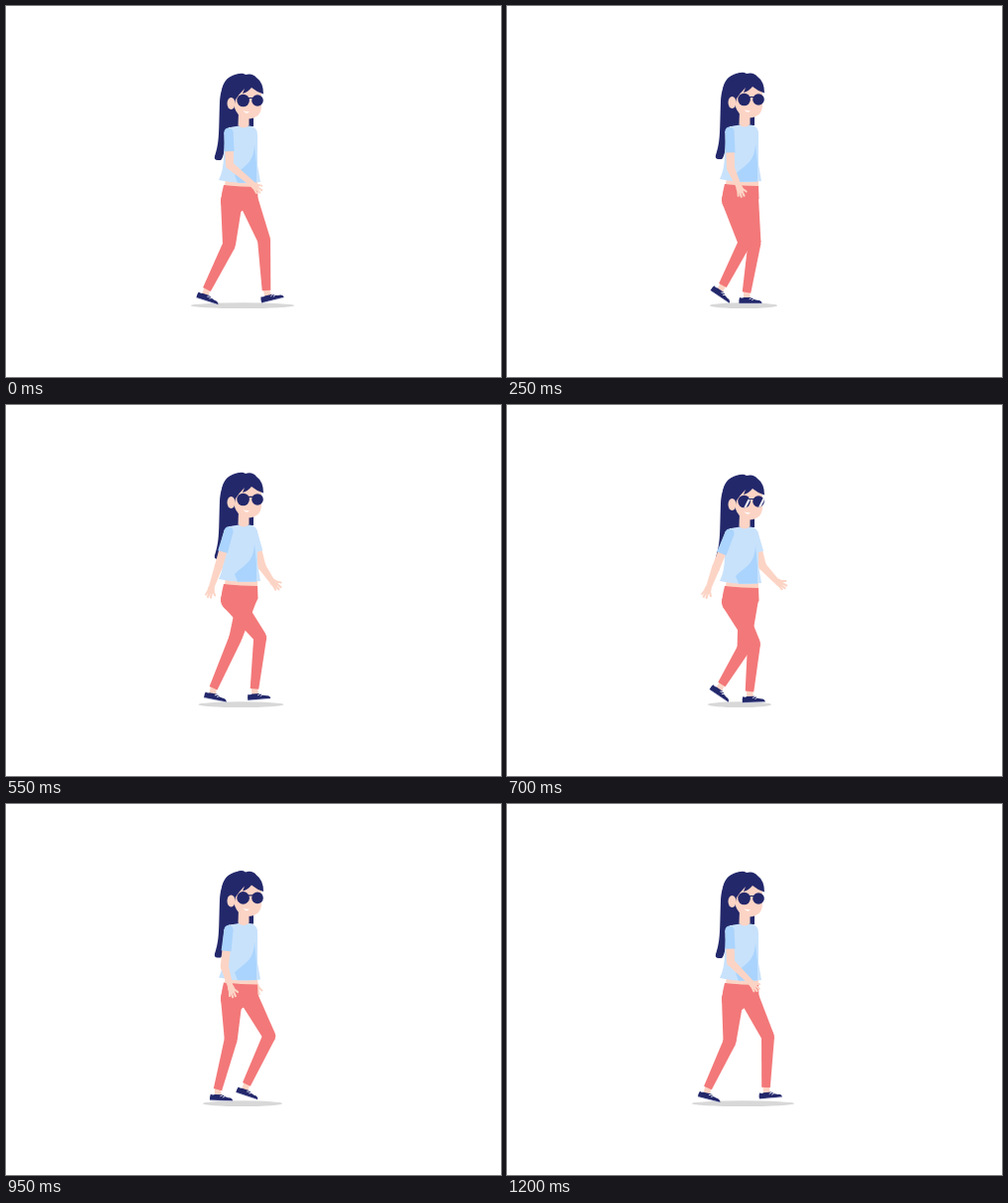
Recreate the animation shown at these times as an HTML page with a canvas. Size 498 by 373 pixels, loop 1.25 s.

```html
<!DOCTYPE html>
<html lang="en">
<head>
<meta charset="utf-8">
<title>Walk cycle</title>
<style>
html, body { margin: 0; width: 100%; height: 100%; overflow: hidden; background: #fff; }
canvas { display: block; }
</style>
</head>
<body>
<canvas id="stage" width="498" height="373"></canvas>
<script>
const ctx = document.getElementById('stage').getContext('2d');
const LOOP = 1250, STEP = 50;
const NAVY = '#23286b', SKIN = '#fcd4c5', PANTS = '#f37879',
      SHIRT = '#c8e2fc', SHADE = '#aad4fd', GREY = '#d8d8d8';

const times = [0, 250, 450, 600, 700, 850, 1050, 1200];

// Legs: knee x, knee y, ankle x, ankle y, foot angle in degrees
const farLeg = [
  [259.5, 235, 262, 286, -14], [249, 238, 241, 288, 0],
  [234, 224, 217, 286, 3], [231, 240, 207, 284, 17],
  [238, 245, 216, 281, 34], [262, 235, 233, 281, 28],
  [264, 233, 250, 283, 8], [262.5, 234, 260.5, 285, -5]
];
const nearLeg = [
  [224.5, 240, 202, 285, 18], [239, 238, 217, 281, 34],
  [245, 232, 232, 282, 13], [259, 235, 256, 287, -11],
  [248.5, 240, 244, 288, -2], [233, 238, 224, 288, 0],
  [222, 236, 204.5, 286, 5], [224, 239, 202, 285.5, 14]
];
// Arms: elbow x, elbow y, wrist x, wrist y, hand angle in degrees
const nearArm = [
  [225, 160, 248, 179, 42], [225, 163, 233, 181, 68],
  [220, 160, 217, 184, 88], [211, 164, 203, 182, 108],
  [210, 164, 203, 183, 110], [214, 163, 218, 184, 70],
  [225, 163, 233, 182, 72], [225, 159, 245, 179, 46]
];
const farArm = [
  [238, 160, 236, 178, 90], [245, 162, 242, 180, 90],
  [255, 163, 260, 181, 72], [258, 162, 270, 175, 30],
  [257, 162, 271, 177, 32], [253, 163, 260, 181, 58],
  [243, 162, 242, 180, 90], [238, 160, 236, 178, 90]
];
// Body bob, shadow left, shadow right
const ground = [
  [0, 186, 290], [-1, 204, 272], [-2, 200, 274], [1, 192, 280],
  [2, 202, 266], [1.2, 202, 272], [-2, 193, 284], [0, 186, 289]
];

// Smooth periodic interpolation through the poses
function sample(track, t) {
  const n = times.length;
  const time = i => times[(i + n) % n] + Math.floor(i / n) * LOOP;
  const pose = i => track[(i + n) % n];
  let i = n - 1;
  while (times[i] > t) i--;
  const span = time(i + 1) - time(i), u = (t - time(i)) / span;
  const slope = (k, c) => (pose(k + 1)[c] - pose(k - 1)[c]) / (time(k + 1) - time(k - 1)) * span;
  return track[0].map((_, c) => {
    const a = pose(i)[c], b = pose(i + 1)[c], u2 = u * u, u3 = u2 * u;
    return a * (2 * u3 - 3 * u2 + 1) + b * (3 * u2 - 2 * u3) +
      slope(i, c) * (u3 - 2 * u2 + u) + slope(i + 1, c) * (u3 - u2);
  });
}

function fill(path, color) {
  ctx.fillStyle = color;
  ctx.fill(new Path2D(path));
}

function ellipse(x, y, rx, ry, color) {
  ctx.fillStyle = color;
  ctx.beginPath();
  ctx.ellipse(x, y, rx, ry, 0, 0, Math.PI * 2);
  ctx.fill();
}

function line(x1, y1, x2, y2, width, color, cap = 'round') {
  ctx.strokeStyle = color;
  ctx.lineWidth = width;
  ctx.lineCap = cap;
  ctx.beginPath();
  ctx.moveTo(x1, y1);
  ctx.lineTo(x2, y2);
  ctx.stroke();
}

// Tapered bar with half-widths r1 and r2
function taper(x1, y1, r1, x2, y2, r2, color) {
  const d = Math.hypot(x2 - x1, y2 - y1) || 1;
  const nx = (y1 - y2) / d, ny = (x2 - x1) / d;
  ctx.fillStyle = color;
  ctx.beginPath();
  ctx.moveTo(x1 + nx * r1, y1 + ny * r1);
  ctx.lineTo(x2 + nx * r2, y2 + ny * r2);
  ctx.lineTo(x2 - nx * r2, y2 - ny * r2);
  ctx.lineTo(x1 - nx * r1, y1 - ny * r1);
  ctx.fill();
}

function place(x, y, degrees, draw) {
  ctx.save();
  ctx.translate(x, y);
  ctx.rotate(degrees * Math.PI / 180);
  draw();
  ctx.restore();
}

function shoe() {
  fill('M-3 -1 L3 -1 L4 7 L-3 7 Z', SKIN);
  fill('M-7 5 Q-4 6 -3 5 L5 5 Q8 8 13 8 Q15.5 9 15.5 11 L-7.5 11 Q-8 8 -7 5 Z', NAVY);
  line(-7, 11.2, 15, 11.2, 0.7, '#c9cbe2', 'butt');
  line(3, 6.6, 5.5, 5.4, 0.8, '#fff');
  line(5.5, 7.6, 7.5, 6.6, 0.8, '#fff');
}

function leg([kx, ky, ax, ay, angle], hx, hy, hr) {
  place(ax, ay, angle, shoe);
  ellipse(hx, hy, hr, hr, PANTS);
  taper(hx, hy, hr, kx, ky, 6.5, PANTS);
  ellipse(kx, ky, 6.4, 6.4, PANTS);
  taper(kx, ky, 6.5, ax, ay, 4.3, PANTS);
}

function hand() {
  ellipse(3, 0, 4.5, 3.5, SKIN);
  line(3, -2, 8, -5, 2, SKIN);
  line(3, -1, 11, -1.5, 2.2, SKIN);
  line(3, 1, 11, 1.5, 2.2, SKIN);
  line(3, 2, 9, 4, 2, SKIN);
}

function arm([ex, ey, wx, wy, angle], sx, sy, sleeve) {
  taper(sx, sy, 4.5, ex, ey, 4, SKIN);
  ellipse(ex, ey, 4, 4, SKIN);
  taper(ex, ey, 4, wx, wy, 2.8, SKIN);
  place(wx, wy, angle, hand);
  const cx = sx + (ex - sx) * 0.58, cy = sy + (ey - sy) * 0.58;
  ellipse(sx, sy, 4.6, 4.6, sleeve);
  taper(sx, sy, 4.6, cx, cy, 5, sleeve);
}

function lens(x, y, r, glint) {
  ellipse(x, y, r, r, NAVY);
  if (glint === null) return;
  ctx.save();
  ctx.clip();
  line(x + glint + 3.5, y - 7, x + glint - 3.5, y + 7, 2, '#fff', 'butt');
  ctx.restore();
}

function backHair() {
  fill('M236 68 C222 69 216 80 215 97 C214 125 215 137 210 151 Q209 155 213 155 L216 155 ' +
    'Q218 154 220 144 L224 122 L249 121 L249 92 Z', NAVY);
}

function torso() {
  fill('M219 180 L253 181 L253.5 195 L236 207 L216 197 Q217 187 219 180 Z', PANTS);
  fill('M221 174 L253 174 L253 182 Q236 182 220 180 Z', SKIN);
  fill('M221 124 Q227 121 234 120.5 L245 120.5 Q252 121 253 130 L253 160 L256 177 ' +
    'Q236 180 214 175 Q219 165 219 150 Z', SHIRT);
  fill('M250 139 C249 159 240 160 230 170 L233 177.8 L252 177.6 L252 160 Z', SHADE);
}

function head(glint) {
  fill('M234 106 L244.5 106 L244.5 120 Q239 125 233.5 120 Z', SKIN);
  fill('M228 88 Q228 112 243 113.5 Q257 113 257 100 L257 82 L230 80 Z', SKIN);
  fill('M218 97 C214 80 222 70 231 70 Q236 66 241 69 Q248 67 252 72 Q259 77 259 88.5 ' +
    'Q253 87 247 82 Q243 87 238 88 L240 83 Q234 89 231 94 L228 108 L219 112 Z', NAVY);
  ellipse(226.5, 98, 4, 6, SKIN);
  lens(238.6, 95, 6.3, glint);
  lens(253, 95, 5.8, glint);
  line(243, 92.5, 250, 92.5, 1.2, NAVY);
  fill('M238.5 105 Q242 107 245 106 Q242 110 238.5 105 Z', '#fff');
}

function draw(t) {
  const [bob, left, right] = sample(ground, t);
  const lifted = paint => {
    ctx.save();
    ctx.translate(0, bob);
    paint();
    ctx.restore();
  };
  const glint = Math.abs(t - 700) <= 100 ? 4 + (t - 700) * 0.1 : null;

  ctx.fillStyle = '#fff';
  ctx.fillRect(0, 0, 498, 373);
  ellipse((left + right) / 2, 301.2, (right - left) / 2, 2.9, GREY);
  lifted(backHair);
  arm(sample(farArm, t), 248, 127 + bob, SHIRT);
  leg(sample(farLeg, t), 243, 193 + bob, 10);
  leg(sample(nearLeg, t), 227, 196 + bob, 11);
  lifted(torso);
  lifted(() => head(glint));
  arm(sample(nearArm, t), 224, 127 + bob, SHADE);
}

function frame() {
  draw(Math.floor(performance.now() / STEP) * STEP % LOOP);
  requestAnimationFrame(frame);
}
frame();
</script>
</body>
</html>
```
